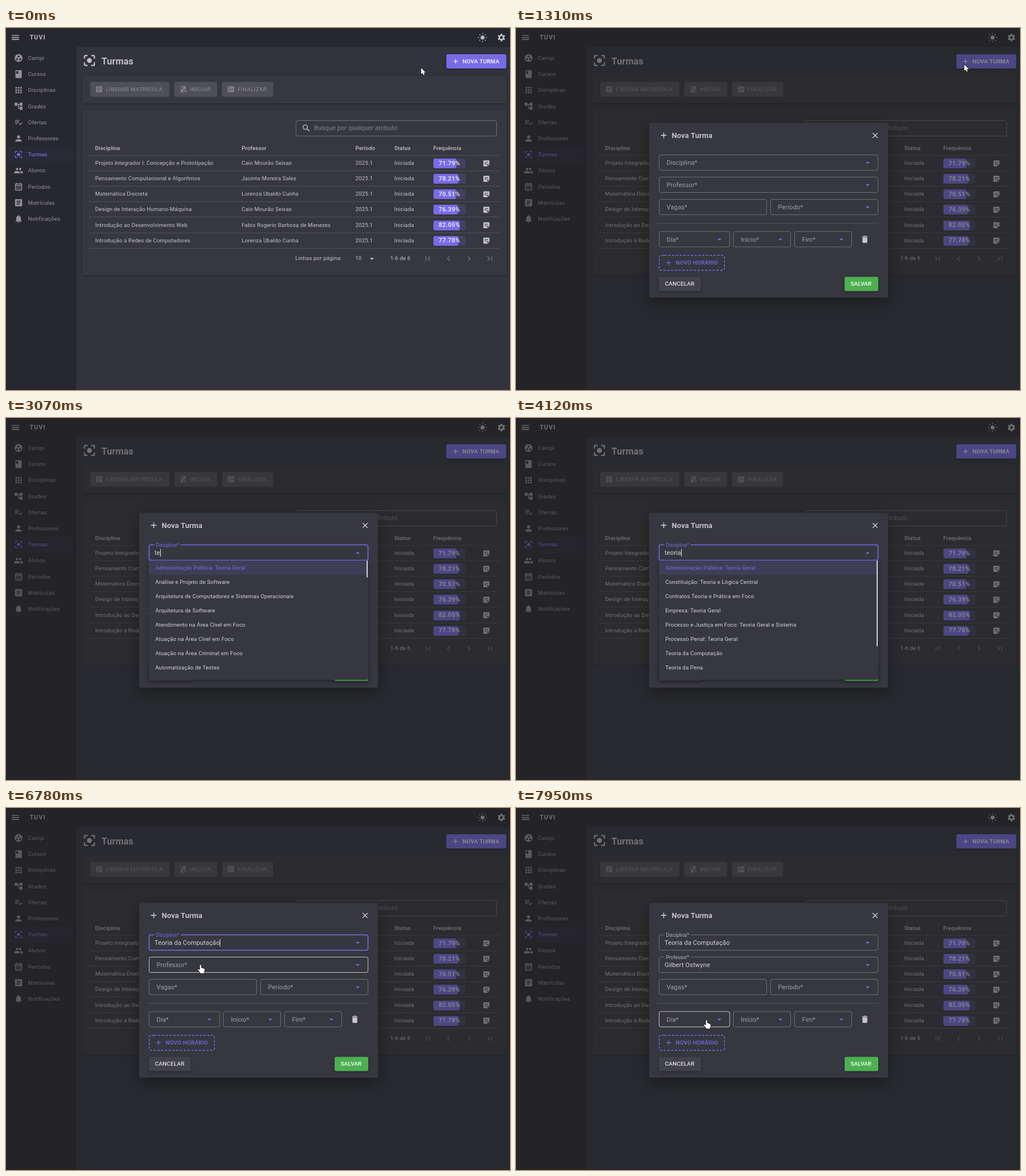
Write an HTML page with a canvas that moves like this. It is 882 by 635 pixels and loops after 7.99 s.

```html
<!DOCTYPE html>
<html lang="pt-BR">
<head>
<meta charset="utf-8">
<title>Turmas</title>
<style>
html, body { margin: 0; width: 100%; height: 100%; overflow: hidden; background: #32333d; }
canvas { display: block; }
</style>
</head>
<body>
<canvas id="stage" width="882" height="635"></canvas>
<script>
const ctx = document.getElementById('stage').getContext('2d');
const LOOP = 7990, ROW = 25, LIST_MAX = 209;
const white = a => `rgba(255,255,255,${a})`;
const PRIMARY = '#776be7', SURFACE = '#373740', DARK = '#27272f', TEXT = white(.7), MUTED = white(.5), BORDER = white(.28);

const spokes = (count, radii, spread) => Array.from({ length: count }, (_, i) => radii.map((r, j) => {
  const a = i * 2 * Math.PI / count - Math.PI / 2 + spread[j];
  return (12 + r * Math.cos(a)).toFixed(2) + ' ' + (12 + r * Math.sin(a)).toFixed(2);
}));
const disc = (x, y, r) => `M${x - r} ${y}a${r} ${r} 0 1 0 ${2 * r} 0a${r} ${r} 0 1 0 ${-2 * r} 0z`;
const squares = (xs, ys, s) => ys.flatMap(y => xs.map(x => `M${x} ${y}h${s}v${s}h-${s}z`)).join('');
const BOOK = 'M18 2H6c-1.1 0-2 .9-2 2v16c0 1.1.9 2 2 2h12c1.1 0 2-.9 2-2V4c0-1.1-.9-2-2-2zM6 4h5v8l-2.5-1.5L6 12z';

const ICONS = {
  menu: 'M3 18h18v-2H3zm0-5h18v-2H3zm0-7v2h18V6z',
  sun: disc(12, 12, 5) + spokes(8, [8.5, 11.3, 11.3, 8.5], [-.11, -.085, .085, .11]).map(p => `M${p.join('L')}z`).join(''),
  gear: 'M' + spokes(6, [7.3, 9.8, 9.8, 7.3], [-.3, -.2, .2, .3]).flat().join('L') + 'z' + disc(12, 12, 3.5),
  campus: disc(12, 12, 10) + disc(8, 15, 2.5) + disc(16, 15, 2.5) + disc(12, 8, 2.5),
  book: BOOK,
  start: BOOK + disc(17, 17, 5) + disc(17, 17, 3.2) + disc(17, 17, 1.5),
  grid: squares([4, 10, 16], [4, 10, 16], 4),
  tree: 'M22 11V3h-7v3H9V3H2v8h7V8h2v10h4v3h7v-8h-7v3h-2V8h2v3z',
  checklist: 'M3 10h11v2H3zm0-4h11v2H3zm0 8h7v2H3zm17.6-2l-4.3 4.2-2.1-2.1-1.4 1.4L16.3 19 22 13.3z',
  person: disc(12, 8, 4) + 'M12 14c-2.7 0-8 1.3-8 4v2h16v-2c0-2.7-5.3-4-8-4z',
  focus: disc(12, 12, 4) + 'M5 15H3v4c0 1.1.9 2 2 2h4v-2H5zM5 5h4V3H5c-1.1 0-2 .9-2 2v4h2zm14-2h-4v2h4v4h2V5c0-1.1-.9-2-2-2zm0 16h-4v2h4c1.1 0 2-.9 2-2v-4h-2z',
  group: disc(16, 8, 3) + disc(8, 8, 3) + 'M8 13c-2.3 0-7 1.2-7 3.5V19h14v-2.5C15 14.2 10.3 13 8 13zm8 0l-1 .1c1.2.8 2 1.9 2 3.4V19h6v-2.5c0-2.3-4.7-3.5-7-3.5z',
  calendar: 'M19 4h-1V2h-2v2H8V2H6v2H5c-1.1 0-2 .9-2 2v14a2 2 0 002 2h14c1.1 0 2-.9 2-2V6c0-1.1-.9-2-2-2zm0 16H5V10h14zM5 8V6h14v2z' + squares([7, 11, 15], [12, 16], 2),
  article: 'M19 3H5c-1.1 0-2 .9-2 2v14c0 1.1.9 2 2 2h14c1.1 0 2-.9 2-2V5c0-1.1-.9-2-2-2zm-5 14H7v-2h7zm3-4H7v-2h10zm0-4H7V7h10z',
  bell: 'M12 22c1.1 0 2-.9 2-2h-4c0 1.1.9 2 2 2zm6-6v-5c0-3.1-1.6-5.6-4.5-6.3V4a1.5 1.5 0 00-3 0v.7C7.6 5.4 6 7.9 6 11v5l-2 2v1h16v-1z',
  check: 'M20 3H4c-1.1 0-2 .9-2 2v14c0 1.1.9 2 2 2h16c1.1 0 2-.9 2-2V5c0-1.1-.9-2-2-2zM10 17H5v-2h5zm0-4H5v-2h5zm0-4H5V7h5zm4.8 6L12 12.2l1.4-1.4 1.4 1.4L18 9l1.4 1.4z',
  search: 'M15.5 14h-.8l-.3-.3A6.5 6.5 0 109.5 16c1.6 0 3.1-.6 4.2-1.6l.3.3v.8l5 5 1.5-1.5zm-6 0a4.5 4.5 0 110-9 4.5 4.5 0 010 9z',
  note: 'M19 3H5c-1.1 0-2 .9-2 2v14c0 1.1.9 2 2 2h10l6-6V5c0-1.1-.9-2-2-2zM7 8h10v2H7zm5 6H7v-2h5zm2 5.5V14h5.5z',
  first: 'M18.4 16.6L13.8 12l4.6-4.6L17 6l-6 6 6 6zM6 6h2v12H6z',
  prev: 'M15.4 7.4L14 6l-6 6 6 6 1.4-1.4-4.6-4.6z',
  next: 'M10 6L8.6 7.4l4.6 4.6-4.6 4.6L10 18l6-6z',
  last: 'M5.6 7.4l4.6 4.6-4.6 4.6L7 18l6-6-6-6zM16 6h2v12h-2z',
  down: 'M7 10l5 5 5-5z',
  up: 'M7 14l5-5 5 5z',
  plus: 'M19 13h-6v6h-2v-6H5v-2h6V5h2v6h6z',
  close: 'M19 6.4L17.6 5 12 10.6 6.4 5 5 6.4l5.6 5.6L5 17.6 6.4 19l5.6-5.6 5.6 5.6 1.4-1.4-5.6-5.6z',
  trash: 'M6 19c0 1.1.9 2 2 2h8c1.1 0 2-.9 2-2V7H6zM19 4h-3.5l-1-1h-5l-1 1H5v2h14z'
};
for (const name in ICONS) ICONS[name] = new Path2D(ICONS[name]);

const CURSORS = {
  arrow: new Path2D('M0 0v11.3l2.6-2.4 1.7 3.9 1.8-.8-1.7-3.8h3.6z'),
  hand: new Path2D('M-1.2 1C-1.2-.4 1-.4 1 1v4l1.6.2.4.5 1.6.2.4.6 1.5.5.5 1v3.2L6 13v2H-.8v-1.4L-4.4 9.4c-.9-1.2.4-2.2 1.5-1.3l1.7 1.5z'),
  text: new Path2D('M-2.5-6H-.7L0-5.4.7-6h1.8M0-5.4V5.4M-2.5 6H-.7L0 5.4.7 6h1.8')
};

const NAV = [['campus', 'Campi'], ['book', 'Cursos'], ['grid', 'Disciplinas'], ['tree', 'Grades'], ['checklist', 'Ofertas'],
  ['person', 'Professores'], ['focus', 'Turmas'], ['group', 'Alunos'], ['calendar', 'Períodos'], ['article', 'Matrículas'], ['bell', 'Notificações']];
const CLASSES = [
  ['Projeto Integrador I: Concepção e Prototipação', 'Caio Mourão Seixas', 71.79],
  ['Pensamento Computacional e Algoritmos', 'Jacinta Moreira Sales', 78.21],
  ['Matemática Discreta', 'Lorenza Ubaldo Cunha', 70.51],
  ['Design de Interação Humano-Máquina', 'Caio Mourão Seixas', 76.39],
  ['Introdução ao Desenvolvimento Web', 'Fabio Rogerio Barbosa de Menezes', 82.05],
  ['Introdução à Redes de Computadores', 'Lorenza Ubaldo Cunha', 77.78]
];
const SUBJECTS = ['Administração Pública: Teoria Geral', 'Análise e Projeto de Software', 'Análise e Visualização de Dados',
  'Arquitetura de Computadores e Sistemas Operacionais', 'Arquitetura de Software', 'Atendimento na Área Cível em Foco',
  'Atuação na Área Cível em Foco', 'Atuação na Área Criminal em Foco', 'Automatização de Testes', 'Constituição: Teoria e Lógica Central',
  'Contratos Teoria e Prática em Foco', 'Design de Interfaces Interativas', 'Empresa: Teoria Geral',
  'Processo e Justiça em Foco: Teoria Geral e Sistema', 'Processo Penal: Teoria Geral', 'Teoria da Computação', 'Teoria da Pena',
  'Teoria do Crime', 'Teoria do Direito', 'Teoria Geral do Processo'];
const TEACHER = 'Gilbert Ostwyne';
const TEACHERS = ['Beatriz Lumiar Prado', TEACHER, 'Heloísa Tramontim'];

// [time, typed text, length of the scrollable list]
const KEYS = [[0, '', 58], [2870, 't', 58], [3070, 'te', 24], [3410, 'teo', 11.6], [3780, 'teor', 11.6], [3950, 'teori', 11.6],
  [4120, 'teoria', 11.6], [4240, 'teoria ', 11.6], [4360, 'teoria d', 0], [4460, 'teoria da', 0], [4560, 'teoria da ', 0], [4940, 'teoria da c', 0]];
const FILTER_DELAY = 120;

// [time, x, y]
const PATH = [[40, 726, 70], [450, 784, 64], [1330, 784, 64], [1390, 681, 118], [1800, 447, 239], [5440, 447, 239], [5600, 500, 244],
  [5730, 500, 244], [5890, 436, 253], [6060, 398, 262], [6300, 398, 262], [6790, 340, 275], [7060, 340, 275], [7340, 338, 327],
  [7440, 338, 327], [7900, 333, 372]];

const lastAt = (list, t) => list.filter(k => k[0] <= t).pop();
const ramp = (t, start, duration) => {
  const p = Math.min(1, Math.max(0, (t - start) / duration));
  return p * p * (3 - 2 * p);
};
const mix = (a, b, p) => a + (b - a) * p;

function setFont(size, weight, spacing) {
  ctx.font = `${weight} ${size}px Roboto, sans-serif`;
  ctx.letterSpacing = size * spacing + 'px';
}
// Baselines sit on whole pixels so that small text stays crisp.
function text(s, x, y, { size = 9.73, color = TEXT, weight = 400, spacing = .0107, align = 'left' } = {}) {
  setFont(size, weight, spacing);
  ctx.textAlign = align;
  ctx.fillStyle = color;
  ctx.fillText(s, x, Math.floor(y));
}
function icon(name, cx, cy, size, color = TEXT) {
  ctx.save();
  ctx.translate(cx - size / 2, cy - size / 2);
  ctx.scale(size / 24, size / 24);
  ctx.fillStyle = color;
  ctx.fill(ICONS[name], 'evenodd');
  ctx.restore();
}
function box(x, y, w, h, fill, r = 3, shadow = 0) {
  ctx.save();
  if (shadow) {
    ctx.shadowColor = 'rgba(0,0,0,.35)';
    ctx.shadowBlur = shadow;
    ctx.shadowOffsetY = shadow / 3;
  }
  ctx.fillStyle = fill;
  ctx.beginPath();
  ctx.roundRect(x, y, w, h, r);
  ctx.fill();
  ctx.restore();
}
function line(x1, x2, y) {
  ctx.fillStyle = white(.13);
  ctx.fillRect(x1, y, x2 - x1, 1);
}
function outline(x, y, w, h, color, width = 1, notch = 0) {
  const r = 3, left = x + 9;
  ctx.strokeStyle = color;
  ctx.lineWidth = width;
  ctx.beginPath();
  ctx.moveTo(left + notch, y);
  ctx.arcTo(x + w, y, x + w, y + h, r);
  ctx.arcTo(x + w, y + h, x, y + h, r);
  ctx.arcTo(x, y + h, x, y, r);
  ctx.arcTo(x, y, left, y, r);
  ctx.lineTo(left, y);
  ctx.stroke();
}
const caps = (s, x, y, color) => text(s, x, y, { color, weight: 500, spacing: .0286 });

function drawPage(t) {
  ctx.fillStyle = '#32333d';
  ctx.fillRect(0, 0, 882, 635);
  ctx.fillStyle = DARK;
  ctx.fillRect(0, 0, 882, 33.5);
  ctx.fillRect(0, 0, 123, 635);
  icon('menu', 16.5, 16.7, 17);
  text('TUVI', 41.5, 20.6, { size: 10.6, weight: 700, spacing: .1 });
  icon('sun', 834, 16.7, 16.7);
  icon('gear', 867, 16.7, 16.7);

  box(4, 208, 113, 28.5, 'rgba(119,107,231,.04)');
  NAV.forEach(([name, label], i) => {
    const y = 52.7 + 28.2 * i, active = label === 'Turmas', color = active ? PRIMARY : MUTED;
    icon(name, 22, y, 16.5, color);
    text(label, 38.6, y + 3.7, { color, weight: active ? 500 : 400 });
  });

  icon('focus', 146, 57, 26);
  text('Turmas', 167, 64, { size: 16.2, weight: 700, spacing: .005 });
  drawNewButton(t);

  box(134, 84, 742, 48, SURFACE, 3, 3);
  [[147.5, 138.5, 'article', 'LIBERAR MATRÍCULA'], [294.5, 75, 'start', 'INICIAR'], [378, 89.5, 'check', 'FINALIZAR']].forEach(([x, w, name, label]) => {
    box(x, 94.5, w, 26, white(.12));
    icon(name, x + 15.5, 107.5, 14, white(.28));
    caps(label, x + 27.5, 111, white(.28));
  });

  box(134, 143, 742, 290.5, SURFACE, 3, 3);
  outline(507.5, 162.5, 351, 27, BORDER);
  icon('search', 525.5, 175.7, 16.7);
  text('Busque por qualquer atributo', 539, 179.8, { size: 11.1, color: white(.38), spacing: .0094 });
  [['Disciplina', 155.9], ['Professor', 412.3], ['Período', 611.5], ['Status', 679.5], ['Frequência', 747.7]]
    .forEach(([s, x]) => text(s, x, 214, { weight: 500 }));
  line(145, 864, 223);
  CLASSES.forEach(([subject, teacher, percent], i) => {
    const y = 237 + 27.13 * i, top = Math.round(y - 8);
    [[subject, 155.9], [teacher, 412.3], ['2025.1', 611.5], ['Iniciada', 679.5]].forEach(([s, x]) => text(s, x, y + 3.5));
    box(748, top, 56, 17, 'rgba(119,107,231,.2)');
    box(748, top, 56 * percent / 100, 17, PRIMARY);
    text(percent.toFixed(2) + '%', 775.8, y + 4, { size: 11.1, weight: 700, color: white(.78), align: 'center' });
    icon('note', 840.7, y + .5, 14.2);
    line(145, 864, Math.round(y + 13));
  });
  text('Linhas por página:', 506.3, 407.6);
  text('10', 611.3, 407.6);
  icon('down', 640.3, 404.7, 16.7);
  text('1-6 de 6', 672.5, 407.6);
  ['first', 'prev', 'next', 'last'].forEach((name, i) => icon(name, 738.5 + 36 * i, 404.5, 16.7, white(.3)));
}

function drawNewButton(t) {
  const hover = ramp(t, 300, 150) * (1 - ramp(t, 850, 250));
  box(770.5, 46, 105, 25, PRIMARY, 3, 4);
  box(770.5, 46, 105, 25, `rgba(90,75,226,${hover})`);
  if (t > 620 && t < 1390) {
    ctx.save();
    ctx.beginPath();
    ctx.roundRect(770.5, 46, 105, 25, 3);
    ctx.clip();
    ctx.fillStyle = white(.2 * (1 - ramp(t, 620, 770)));
    ctx.beginPath();
    ctx.arc(784, 62, 100 * ramp(t, 560, 440), 0, 7);
    ctx.fill();
    ctx.restore();
  }
  icon('plus', 786.7, 58.5, 14, '#fff');
  caps('NOVA TURMA', 799, 62, '#fff');
}

function drawField(x, y, w, label, { arrow = 'down', focus = false, hover = false, lift = 0, value = '', caretSince = null, t = 0 } = {}) {
  const size = mix(11.1, 8.3, lift);
  setFont(size, 400, .0094);
  const notch = lift && (ctx.measureText(label).width + 6) * Math.min(1, lift * 3);
  outline(x, y, w, 27, focus ? PRIMARY : hover ? TEXT : BORDER, focus ? 1.5 : 1, notch);
  text(label, x + mix(13, 12, lift), y + mix(18.2, 3.5, lift),
    { size, color: focus ? PRIMARY : white(mix(.53, .65, lift)), spacing: .0094 });
  text(value, x + 9.5, y + 18, { size: 11.1, color: white(.78), spacing: .0094 });
  if (focus && caretSince !== null && (t - caretSince) % 1000 < 500) {
    ctx.fillStyle = white(.85);
    ctx.fillRect(Math.round(x + 9.8 + ctx.measureText(value).width), y + 7.5, 1, 13);
  }
  if (arrow) icon(arrow, x + w - 18, y + 14, 16.7, PRIMARY);
}

function drawList(y, options, alpha, hovered = 0, total = 0) {
  if (alpha <= 0) return;
  const h = Math.min(options.length * ROW, LIST_MAX);
  ctx.save();
  ctx.globalAlpha *= alpha;
  box(250, y, 384, h, SURFACE, 3, 9);
  ctx.beginPath();
  ctx.rect(250, y, 384, h);
  ctx.clip();
  options.slice(0, 9).forEach((s, i) => {
    if (i === 0) box(250, y, 384, ROW, 'rgba(119,107,231,.13)', 0);
    else if (i === hovered) box(250, y + i * ROW, 384, ROW, white(.05), 0);
    text(s, 261.2, y + i * ROW + 16, { color: i ? white(.78) : PRIMARY });
  });
  if (total * ROW > LIST_MAX) box(631, y, 2, LIST_MAX * LIST_MAX / (total * ROW), white(.75), 1);
  ctx.restore();
}

function drawDialog(t) {
  const shown = ramp(t, 800, 180);
  if (!shown) return;
  ctx.save();
  ctx.fillStyle = `rgba(33,33,33,${.498 * ramp(t, 760, 200)})`;
  ctx.fillRect(0, 0, 882, 635);
  ctx.globalAlpha = shown;
  const scale = mix(.9, 1, shown);
  ctx.translate(442 * (1 - scale), 320 * (1 - scale));
  ctx.scale(scale, scale);

  box(233, 166.5, 418, 306.5, SURFACE, 3, 28);
  icon('plus', 258.5, 188.3, 16.7, white(.78));
  text('Nova Turma', 272.5, 193.3, { size: 12.9, weight: 700, spacing: .0075, color: TEXT });
  icon('close', 628.5, 188.5, 16.7, white(.78));

  const typed = lastAt(KEYS, t);
  const subjectSince = lastAt([[0], [2100], ...KEYS.slice(1), [6290]], t)[0];
  const subjectOpen = t >= 2000 && t < 6140, teacherOpen = t >= 6880 && t < 7400;
  drawField(250.5, 222.5, 383, 'Disciplina*', {
    t, focus: t >= 2000 && t < 6880, hover: t >= 1700 && t < 2000, lift: ramp(t, 1975, 200),
    arrow: subjectOpen ? 'up' : 'down', value: t < 6140 ? typed[1] : 'Teoria da Computação', caretSince: subjectSince
  });
  drawField(250.5, 261.5, 383, 'Professor*', {
    t, focus: t >= 6880 && t < 7920, hover: t >= 6600 && t < 6880, lift: ramp(t, 6880, 200),
    arrow: teacherOpen ? 'up' : 'down', value: t < 7400 ? '' : TEACHER, caretSince: t < 7450 ? 6940 : 7450
  });
  drawField(250.5, 300.5, 188, 'Vagas*', { arrow: null });
  drawField(445.5, 300.5, 188, 'Período*');
  line(246, 634, 342);
  drawField(250.5, 357, 123.5, 'Dia*', { hover: t >= 7780 });
  drawField(380.5, 357, 100, 'Início*');
  drawField(487.5, 357, 100, 'Fim*');
  icon('trash', 610.5, 370.7, 16.7, white(.72));

  ctx.setLineDash([4, 2.6]);
  outline(250.7, 398.7, 114, 26.3, PRIMARY, 1.4);
  ctx.setLineDash([]);
  icon('plus', 267, 411.7, 14, PRIMARY);
  caps('NOVO HORÁRIO', 279.5, 415.2, PRIMARY);
  box(250, 436.5, 73.5, 25, '#424249', 3, 4);
  caps('CANCELAR', 260.7, 452.3, white(.85));
  box(575, 436.5, 59, 25, '#4caf50', 3, 4);
  caps('SALVAR', 585.7, 452.3, '#fff');

  const query = lastAt(KEYS, t - FILTER_DELAY);
  const matches = SUBJECTS.filter(s => s.toLowerCase().includes(query[1]));
  drawList(250, matches, ramp(t, 2020, 190) * (1 - ramp(t, 6140, 250)), 0, query[2]);
  drawList(289, TEACHERS, ramp(t, 6920, 190) * (1 - ramp(t, 7420, 250)), t > 7180 ? 1 : 0);
  ctx.restore();
}

function drawCursor(t) {
  if (t >= 2870 && t < 5470) return;
  const from = lastAt(PATH, t) || PATH[0];
  const to = PATH[PATH.indexOf(from) + 1] || from;
  const p = to === from ? 0 : Math.max(0, (t - from[0]) / (to[0] - from[0]));
  const eased = p * (2 - p);
  const x = Math.round(mix(from[1], to[1], eased)), y = Math.round(mix(from[2], to[2], eased));
  let kind = 'arrow';
  if (t > 5470 || (t < 800 && x >= 770)) kind = 'hand';
  else if (t > 1400 && y > 222) kind = 'text';

  ctx.save();
  ctx.translate(x + .5, y);
  ctx.lineJoin = 'round';
  if (kind === 'text') {
    ctx.strokeStyle = white(.9);
    ctx.lineWidth = 1;
    ctx.stroke(CURSORS.text);
  } else {
    ctx.strokeStyle = '#000';
    ctx.lineWidth = 1.2;
    ctx.stroke(CURSORS[kind]);
    ctx.fillStyle = '#fff';
    ctx.fill(CURSORS[kind]);
  }
  ctx.restore();
}

function frame() {
  const t = performance.now() % LOOP;
  drawPage(t);
  drawDialog(t);
  drawCursor(t);
  requestAnimationFrame(frame);
}
frame();
</script>
</body>
</html>
```
